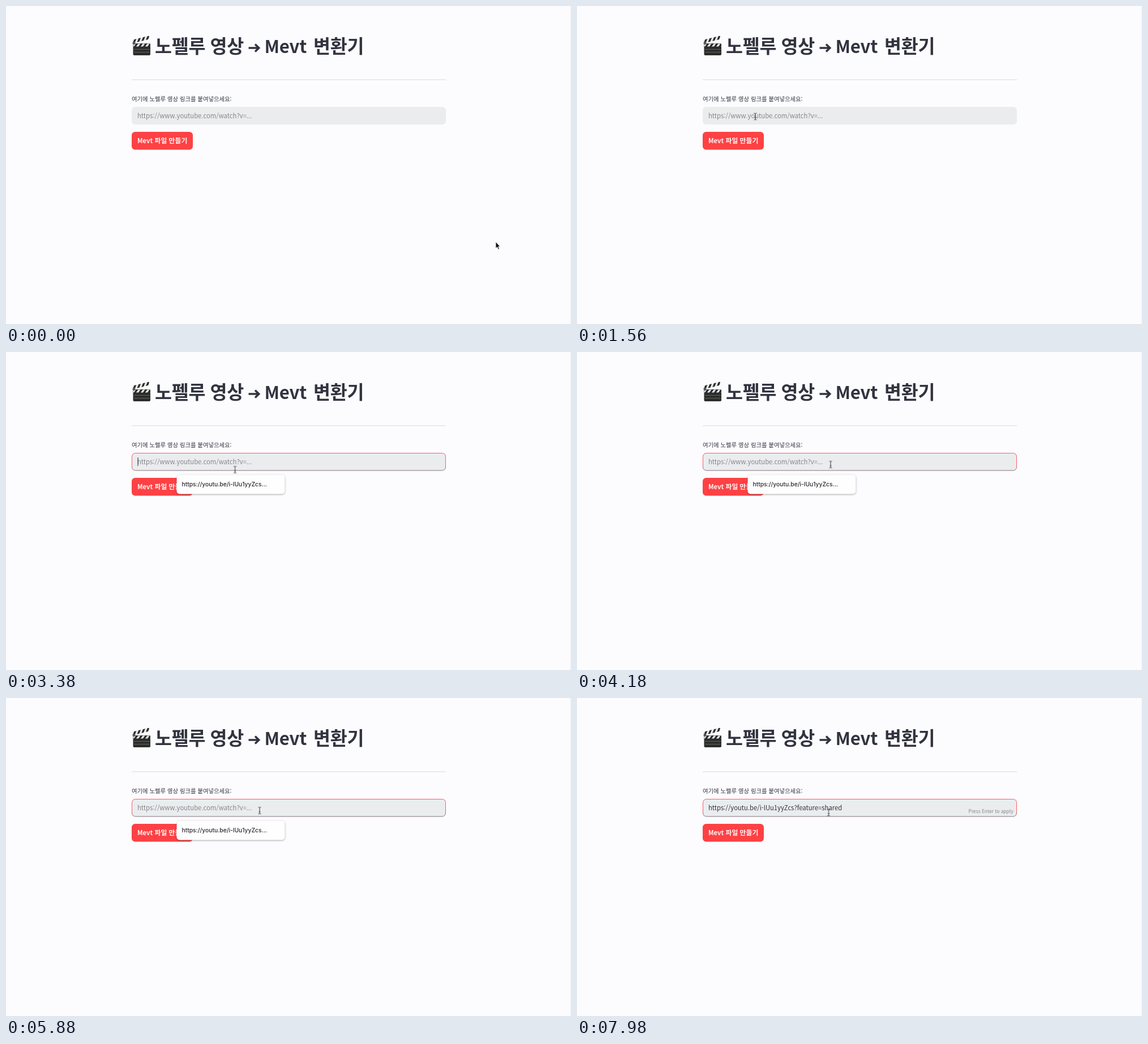
Animation, 998 px wide and 561 px high, one loop 8000 ms. Source, as an HTML page:

```html
<!DOCTYPE html>
<html lang="ko">
<head>
<meta charset="utf-8">
<title>영상 변환기</title>
<style>
  html, body { margin: 0; width: 100%; height: 100%; overflow: hidden; background: #fcfcfe; }
  svg { display: block; width: 100vw; height: 100vh; }
  text { font-family: "Noto Sans CJK KR", "Noto Sans CJK", sans-serif; fill: #31333f; white-space: pre; }

  .title { font-size: 32.6px; font-weight: 700; letter-spacing: -.17px; }
  .title .latin { font-size: 31.1px; }
  .label { font-size: 10.37px; }
  .field { font-size: 11.28px; }
  .placeholder { fill: #85868d; }
  .button text { font-size: 11.85px; font-weight: 600; fill: #fff4f4; }
  .button .latin { font-size: 11.28px; }
  .hint { font-size: 8.4px; fill: #85868d; text-anchor: end; }
  .popup rect { fill: #fefefe; filter: drop-shadow(0 1px 1.5px #0005); }
  .popup text { font: 500 10.3px Inter, sans-serif; fill: #28282d; }

  /* One 8 s timeline; hard switches use step-end. */
  .focus  { animation: focus 8s linear infinite; }
  .switch { animation: 8s step-end infinite; }
  .placeholder { animation-name: until-paste; }
  .pasted { animation-name: after-paste; }
  .popup  { animation-name: popup; }
  .caret-start { animation-name: caret-start; }
  .caret-end   { animation-name: caret-end; }
  .arrow { animation-name: arrow; }
  .beam  { animation-name: beam; }
  .pointer { animation: move 8s linear infinite; }

  @keyframes focus { 0%, 31.25% { opacity: 0 } 33.75%, 100% { opacity: 1 } }
  @keyframes until-paste { 0% { opacity: 1 } 75.75%, 100% { opacity: 0 } }
  @keyframes after-paste { 0% { opacity: 0 } 75.75%, 100% { opacity: 1 } }
  @keyframes popup { 0% { opacity: 0 } 32% { opacity: 1 } 75.75%, 100% { opacity: 0 } }
  @keyframes caret-start {
    0% { opacity: 0 } 31.25% { opacity: 1 } 34.5% { opacity: 0 }
    40.5% { opacity: 1 } 47% { opacity: 0 } 53% { opacity: 1 } 59.5% { opacity: 0 }
    65.5% { opacity: 1 } 72%, 100% { opacity: 0 }
  }
  @keyframes caret-end {
    0% { opacity: 0 } 75.75% { opacity: 1 } 88.5% { opacity: 0 }
    95% { opacity: 1 } 99.5%, 100% { opacity: 0 }
  }
  @keyframes arrow { 0% { opacity: 1 } 15.5%, 100% { opacity: 0 } }
  @keyframes beam { 0% { opacity: 0 } 15.5%, 100% { opacity: 1 } }
  @keyframes move {
    0%, 2.5% { transform: translate(865px, 416px); animation-timing-function: ease-in-out }
    17.5%, 37.5% { transform: translate(315px, 195px); animation-timing-function: ease-in-out }
    42.25% { transform: translate(404.5px, 207.5px); animation-timing-function: ease-in-out }
    49%, 96.75% { transform: translate(448px, 198.5px) }
    99.75%, 100% { transform: translate(444.5px, 202px) }
  }
</style>
</head>
<body>
<svg viewBox="0 0 998 561" preserveAspectRatio="none">
  <defs>
    <linearGradient id="ring" x1="0" y1="0" x2="0" y2="1">
      <stop offset=".65" stop-color="#fb5f68"/>
      <stop offset="1" stop-color="#7d7680"/>
    </linearGradient>
    <pattern id="stripes" width="8" height="8" patternUnits="userSpaceOnUse" patternTransform="skewX(-35)">
      <rect width="8" height="8" fill="#2b2c2d"/>
      <rect width="4" height="8" fill="#e9e9e6"/>
    </pattern>
  </defs>
  <rect width="998" height="561" fill="#fcfcfe"/>
  <path d="M997 0V561" stroke="#f0f0f4"/>

  <g class="clapper">
    <rect x="224.5" y="66" width="30.5" height="21" rx="2" fill="#2b2c2d"/>
    <rect x="225" y="66.5" width="29.5" height="5" fill="url(#stripes)"/>
    <path d="M226 76.5H254M226 81.5H254" stroke="#77785b" stroke-width=".8"/>
    <g transform="translate(222.5 60) rotate(-14)">
      <rect width="31" height="6" rx="1" fill="url(#stripes)"/>
    </g>
    <circle cx="226" cy="65.5" r="2.5" fill="#55575a"/>
  </g>

  <g class="title">
    <text x="263" y="82.5">노펠루</text>
    <text x="360.5" y="82.5">영상</text>
    <path d="M428.5 74H446M440 67.5L446.7 74L440 80.5" fill="none" stroke="#31333f" stroke-width="3.6"/>
    <text class="latin" x="456.5" y="82.5">Mevt</text>
    <text x="543" y="82.5">변환기</text>
  </g>
  <path d="M222 130H777" stroke="#d8d9df"/>

  <text class="label" x="222" y="168">여기에 노펠루 영상 링크를 붙여넣으세요:</text>
  <rect x="222" y="178" width="555" height="31" rx="6" fill="#ebecee"/>
  <rect class="focus" x="222.5" y="178.5" width="554" height="30.5" rx="6" fill="none" stroke="url(#ring)"/>
  <text class="field placeholder switch" x="232" y="198">https://www.youtube.com/watch?v=...</text>
  <g class="pasted switch">
    <text class="field" x="232" y="198">https://youtu.be/i-lUu1yyZcs?feature=shared</text>
    <text class="hint" x="770.5" y="203">Press Enter to apply</text>
  </g>
  <path class="caret-start switch" d="M233 186V201" stroke="#31333f"/>
  <path class="caret-end switch" d="M470 186V201" stroke="#31333f"/>

  <g class="button">
    <rect x="222" y="222" width="108" height="31.5" rx="6" fill="#fe4144"/>
    <text class="latin" x="232" y="242">Mevt</text>
    <text x="262.5" y="242">파일 만들기</text>
  </g>
  <g class="popup switch">
    <rect x="301.5" y="216.5" width="191" height="34" rx="5"/>
    <text x="310.5" y="237">https://youtu.be/i-lUu1yyZcs...</text>
  </g>

  <g class="pointer">
    <path class="arrow switch" d="M0 0V11.5L2.6 9.2L4.5 13.4L6.4 12.5L4.6 8.5H7.8Z" fill="#111" stroke="#fff" stroke-width=".8"/>
    <path class="beam switch" d="M-2.5 -6Q0 -6 0 -4.5Q0 -6 2.5 -6M0 -4.5V4.5M-2.5 6Q0 6 0 4.5Q0 6 2.5 6M-1.5 2H1.5" fill="none" stroke="#3a3a40"/>
  </g>
</svg>
</body>
</html>
```
